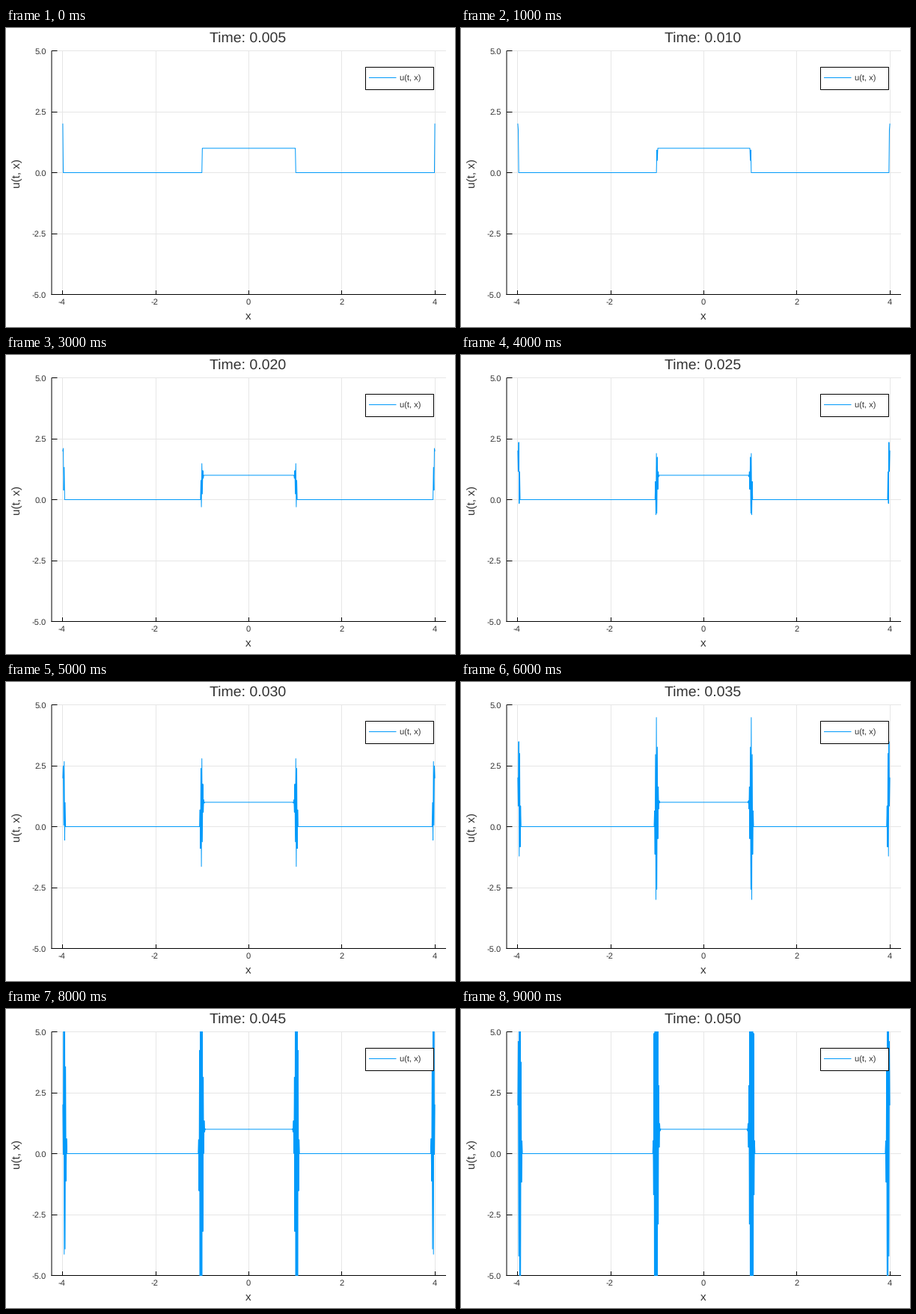
Write a matplotlib script that moves like this. It is 600 px wide and 400 px high and loops after 10000 ms.

```python
import numpy as np
import matplotlib
import matplotlib.pyplot as plt
from matplotlib.animation import FuncAnimation
from matplotlib.patches import Rectangle

matplotlib.rcParams["path.simplify"] = False
matplotlib.rcParams["font.family"] = "Liberation Sans"
matplotlib.rcParams["text.hinting"] = "none"

W, H, DPI = 600, 400, 100
PX = 72 / DPI
LEFT, RIGHT, TOP, BOTTOM = 61, 588, 30.5, 356.5
BLUE, INK = "#009afa", "#333333"

DT, DX, DIFF, FRAMES = 0.005, 0.01, 0.01, 10
x = np.round(np.arange(-400, 401) * DX, 2)


def to_x(v):
    return (LEFT + RIGHT) / 2 + v * (RIGHT - LEFT) / 8.48


def to_y(v):
    return (TOP + BOTTOM) / 2 - v * (BOTTOM - TOP) / 10


def step(u):
    """Explicit step of u_t = D u_xx - sin(x) u_x with upwind drift."""
    fwd = u[2:] - u[1:-1]
    back = u[1:-1] - u[:-2]
    b = -np.sin(x[1:-1])
    drift = np.where(b > 0, b * fwd, b * back)
    new = u.copy()
    new[1:-1] += DT * (DIFF * (fwd - back) / DX**2 + drift / DX)
    return new


u0 = np.where(np.abs(x) <= 1, 1.0, 0.0)
u0[[0, -1]] = 2
states = [u0]
for _ in range(FRAMES - 1):
    states.append(step(states[-1]))

fig = plt.figure(figsize=(W / DPI, H / DPI), dpi=DPI, facecolor="white")
ax = fig.add_axes([0, 0, 1, 1])
ax.set_xlim(0, W)
ax.set_ylim(H, 0)
ax.axis("off")


def rule(x0, y0, x1, y1, color="black", z=1):
    ax.plot([x0, x1], [y0, y1], color=color, lw=PX, zorder=z,
            snap=False, solid_capstyle="butt")


def label(px, py, s, size, ha="center", **kw):
    kw.setdefault("va", "baseline")
    return ax.text(px, py, s, size=size, ha=ha, color=INK, zorder=6, **kw)


def mid(v):
    return np.floor(v) + 0.5


for v in (-4, -2, 0, 2, 4):
    gx = mid(to_x(v))
    rule(gx, TOP, gx, BOTTOM, "#e6e6e6")
    rule(gx, BOTTOM, gx, BOTTOM - 5.5, z=2)
    label(to_x(v) - (1.9 if v < 0 else 0.6), 370, str(v), 8)

for v in (-5, -2.5, 0, 2.5, 5):
    gy = mid(to_y(v))
    rule(LEFT, gy, RIGHT, gy, "#e6e6e6")
    rule(LEFT, gy, LEFT + 7.5, gy, z=2)
    label(54, to_y(v) + 4, f"{v:.1f}", 8, ha="right")

rule(LEFT, TOP, LEFT, BOTTOM + 0.5, z=2)
rule(LEFT - 0.5, BOTTOM, RIGHT, BOTTOM, z=2)

label(324, 389.5, "x", 11)
label(15.5, 194.5, "u(t, x)", 11, rotation=90, va="center")
title = label(323.3, 19, "", 14)

curve, = ax.plot([], [], color=BLUE, lw=PX, zorder=3, snap=False)
curve.set_clip_path(Rectangle((LEFT, TOP - 0.5), RIGHT - LEFT,
                              BOTTOM - TOP + 1, transform=ax.transData))

ax.add_patch(Rectangle((479.5, 51.5), 91, 30, fc="white", ec="black",
                       lw=PX, zorder=4))
rule(485, 66.5, 521.5, 66.5, BLUE, z=5)
label(526, 71, "u(t, x)", 8, ha="left")


def draw(i):
    curve.set_data(to_x(x), to_y(states[i]))
    title.set_text(f"Time: {(i + 1) * DT:.3f}")
    return curve, title


anim = FuncAnimation(fig, draw, frames=FRAMES, interval=1000, repeat=True,
                     repeat_delay=0)
plt.show()
```
